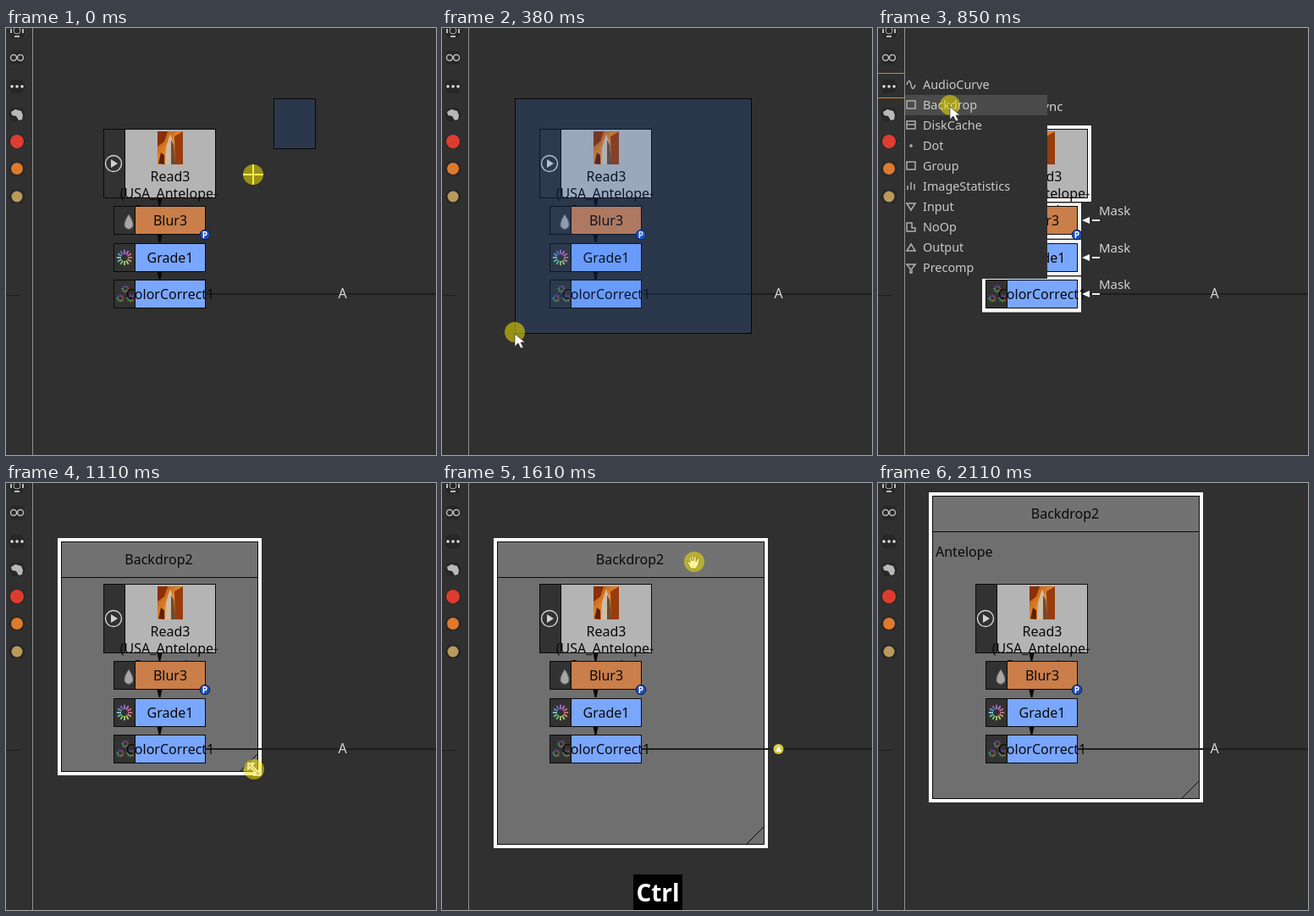
An HTML page that plays this animation: 508x504 px, repeating every 2.24 s.

```html
<!DOCTYPE html>
<html lang="en">
<head>
<meta charset="utf-8">
<title>Node graph backdrop</title>
<style>
html, body { margin: 0; width: 100%; height: 100%; overflow: hidden; background: #303030; }
svg { display: block; width: 508px; height: 504px; }
text { font: 16px "Noto Sans", "Open Sans", sans-serif; }
.mid { text-anchor: middle; }
</style>
</head>
<body>
<svg id="stage" viewBox="0 0 508 504"></svg>
<script>
const LOOP = 2240;
const STEPS = [0, 130, 250, 380, 500, 630, 850, 980, 1110, 1230, 1370, 1490, 1610, 1740, 1860, 1990, 2110];
const BG = '#303030', INK = '#0a0a0a', LIGHT = '#d2d2d2';

const attrs = o => Object.entries(o).map(([k, v]) => `${k}="${v}"`).join(' ');
const rect = (x, y, w, h, fill, o = {}) =>
  `<rect x="${x}" y="${y}" width="${w}" height="${h}" fill="${fill}" ${attrs(o)}/>`;
const circle = (x, y, r, fill, o = {}) => `<circle cx="${x}" cy="${y}" r="${r}" fill="${fill}" ${attrs(o)}/>`;
const path = (d, fill, stroke = 'none', width = 1) =>
  `<path d="${d}" fill="${fill}" stroke="${stroke}" stroke-width="${width}"/>`;
const label = (s, x, y, fill = INK, extra = 'class="mid"') => `<text x="${x}" y="${y + 6}" fill="${fill}" ${extra}>${s}</text>`;
const left = (s, x, y, fill, size = 16) => label(s, x, y, fill, `style="font-size:${size}px"`);
const group = (id, body) => `<g id="${id}">${body}</g>`;

// Ring of coloured spokes used by the colour nodes
function wheel(cx, cy, inner, outer, count, width, light) {
  return Array.from({ length: count }, (_, i) => {
    const a = i / count * 2 * Math.PI, c = Math.cos(a), s = Math.sin(a);
    return path(`M${cx + c * inner} ${cy + s * inner}L${cx + c * outer} ${cy + s * outer}`,
      'none', `hsl(${i * 360 / count},38%,${light}%)`, width);
  }).join('');
}

const nodeBox = (x, y, w, h, strip, fill) =>
  rect(x + .5, y + .5, w, h, fill, { stroke: INK }) + rect(x + 1, y + 1, strip, h - 1, '#323232') +
  path(`M${x + strip + .5} ${y}v${h}`, 'none', INK);

const smallNode = (name, y, fill, icon) => nodeBox(127, y, 108, 33, 25, fill) + icon + label(name, 194, y + 17);
const link = y => path(`M178.5 ${y}h6l-2 9h-2z`, INK);

function sidebar() {
  const dots = [7, 13, 19].map(x => circle(x, 69, 1.8, '#ddd')).join('');
  const frames = [4, 35, 69, 102, 134, 166, 199].map(y =>
    path(`M7 ${y - 8}h12l4 8l-4 8h-12l-4-8z`, '#272727')).join('');
  return rect(0, 0, 31, 504, BG) + path('M0 315.5h17', 'none', '#1f1f1f') + frames +
    path('M31.5 0V504', 'none', '#929292') +
    circle(13, 3, 4, 'none', { stroke: '#aaa' }) + path('M6 1v5M20 1v5M10 10h6', 'none', '#bbb', 2) +
    circle(9, 35, 3.5, 'none', { stroke: '#bbb', 'stroke-width': 1.5 }) +
    circle(17, 35, 3.5, 'none', { stroke: '#bbb', 'stroke-width': 1.5 }) + dots +
    path('M6 99l5-3 7 2 2 5-1 5-4 1-3-5-5-1z', '#b8b8b8') +
    circle(13, 134, 8, '#dd3d30') + circle(13, 166, 7, '#de7a2c') + circle(13, 199, 6.5, '#b99a5c');
}

function readNode() {
  return nodeBox(115, 119, 132, 81, 25, '#b4b4b4') +
    circle(127, 160, 9.5, 'none', { stroke: '#d0d0d0', 'stroke-width': 1.4 }) +
    path('M124 155l8 5-8 5z', '#d0d0d0') +
    rect(179, 122, 30, 39, 'url(#canyon)') +
    path('M179 122h12l-4 12-8 6z', '#8a2f08') + path('M199 128l10-6v39h-9z', '#983c0c') +
    path('M188 161l1-20 3-10 2-6 3 9 2 27z', '#d0bda6') + path('M195 132l3 6 2 23h-5z', '#6b4c38') +
    path('M180 160l3-13 4 3v11z', '#5f2008') +
    label('Read3', 194, 175) + label('(USA_Antelope-', 192.5, 195) + label('Canyon.jpg', 192, 215);
}

const whiteEdge = (x, y, w, h) => rect(x, y, w, h, '#f8f8f8', { stroke: '#111', 'stroke-width': .8 });

function selectedParts() {
  const masks = [227, 271, 314].map(y =>
    path(`M241 ${y}l9-4v8z`, '#fff') + path(`M253 ${y}h9`, 'none', '#eee', 2) +
    left('Mask', 261, y - 12, LIGHT, 15)).join('');
  return masks + path('M181.5 87v20', 'none', '#e4e4e4', 2) + path('M177.5 105h8l-4 9z', '#e4e4e4') +
    left('Sync', 186, 92, LIGHT, 15);
}

const selectedEdges = () => whiteEdge(110.5, 114.5, 142, 91) +
  [206, 249.5, 293].map(y => whiteEdge(122.5, y, 118, 43)).join('');

function menu() {
  const names = ['AudioCurve', 'Backdrop', 'DiskCache', 'Dot', 'Group', 'ImageStatistics', 'Input', 'NoOp', 'Output', 'Precomp'];
  const icons = ['M34 67q3-9 5 0t5 0', 'M34 86h10v9h-10z', 'M34 110h10v9h-10zM34 114h10', 'M39 137v4M37 139h4',
    'M34 158h10v9h-10z', 'M35 191v-5M39 191v-9M43 191v-7', 'M34 207l5 8 5-8z', 'M34 230h6v6h4v4h-10z',
    'M34 263l5-8 5 8z', 'M34 279h10l-4 5v5h-2v-5z'];
  return rect(32, 54, 168, 242, '#303030') + rect(32, 79, 168, 24, '#4b4b4b', { id: 'hover' }) +
    names.map((n, i) => left(n, 53, 66 + i * 24, '#c8c8c8', 14.4) + path(icons[i], 'none', '#b0b0b0', 1.5)).join('');
}

const pointers = {
  cross: path('M-12 0H12M0-12V12', 'none', '#f5ef50', 2),
  arrow: path('M0 2l0 15 4-4 3 6 3-1-3-6h5z', '#fff', '#333', .7),
  resize: path('M-7-7h7l-2.5 2.5 7 7 2.5-2.5v7h-7l2.5-2.5-7-7-2.5 2.5z', '#d8c94a', '#fff6b0', 1.3),
  hand: path('M-4 8l-4-7q0-3 3 0l-1-6q1-2 2 0l1 4v-6q1-2 2 0v6l1-5q2-2 2 0v6l2-4q2-1 2 1l-1 6-3 5z', '#fff3a0', '#8a7a10', .6)
};

const stage = document.getElementById('stage');
stage.innerHTML =
  `<defs><linearGradient id="canyon" x1="0" x2="1" y2="1"><stop stop-color="#b04b0a"/>
   <stop offset=".5" stop-color="#e48a2c"/><stop offset="1" stop-color="#8f3406"/></linearGradient></defs>` +
  rect(0, 0, 508, 504, BG) + group('backdrop', '') +
  path('M236 314H508', 'none', '#1e1e1e', 2) +
  group('outputName', label('A', 397.5, 313, '#d6d6d6')) +
  group('pipeDot', circle(397.5, 314, 6, '#d8cc3c') + path('M394 317l3.5-7 3.5 7z', '#fff')) +
  [201, 244, 288].map(link).join('') + group('edges', selectedEdges()) + readNode() +
  smallNode('Blur3', 210, '#ca7e4a', path('M145 220q8 12 3.5 16q-3.5 3-7 0q-4.500-4 3.500-16z', '#a6a6a6', '#666')) +
  smallNode('Grade1', 254, '#79a6ff', wheel(140, 271, 4, 9.2, 12, 2, 58)) +
  smallNode('ColorCorrect1', 297, '#79a6ff',
    wheel(141, 308, 2, 4.6, 8, 1.3, 48) + wheel(135, 319, 2, 4.6, 8, 1.3, 48) + wheel(147, 319, 2, 4.6, 8, 1.3, 48)) +
  circle(235, 244, 5.8, '#1d4fb8', { stroke: '#0b1e50' }) +
  `<text x="235" y="247.7" class="mid" fill="#fff" style="font-size:10px;font-weight:bold">P</text>` +
  group('inputs', selectedParts()) +
  `<rect id="marquee" fill="rgba(15,95,221,.15)" stroke="#080808"/>` +
  sidebar() +
  group('button', path('M0 53.500H31M0 82.500H31', 'none', '#d88328')) +
  group('menu', menu()) +
  group('ctrl', rect(226, 462, 58, 42, '#000') +
    `<text x="255" y="494" class="mid" fill="#fff" style="font-size:28px;font-weight:bold">Ctrl</text>`) +
  group('cursor', '');

const $ = id => document.getElementById(id);
const show = (id, on) => $(id).setAttribute('visibility', on ? 'visible' : 'hidden');

// Keys are [time, x, y], joined by straight moves
function track(keys, t) {
  const i = keys.findIndex(k => k[0] > t);
  if (i < 0) return keys[keys.length - 1].slice(1);
  if (i === 0) return keys[0].slice(1);
  const a = keys[i - 1], b = keys[i], u = (t - a[0]) / (b[0] - a[0]);
  return [1, 2].map(n => a[n] + (b[n] - a[n]) * u);
}

const cursorPath = [[0, 292, 173], [250, 112, 338], [380, 86, 359], [500, 48, 205], [630, 16, 66],
  [850, 85, 91], [980, 196, 226], [1110, 293, 338], [1230, 294, 338], [1370, 331, 383],
  [1490, 382, 428], [1610, 298, 93], [1740, 298, 93], [1990, 296, 39]];
const cornerPath = [[0, 316, 142], [250, 115, 337], [380, 86, 360]];
const sizePath = [[1230, 237, 276], [1370, 269, 317], [1490, 320, 362]];
const originPath = [[1740, 63, 67], [1990, 62, 13]];

function drawBackdrop(t) {
  const [x, y] = track(originPath, t).map(Math.round);
  const [w, h] = track(sizePath, t).map(Math.round);
  const r = x + w - 2.5, b = y + h - 2.5;
  return rect(x, y, w, h, '#6f6f6f', { stroke: '#fff', 'stroke-width': 4 }) +
    rect(x + 2.5, y + 2.5, w - 5, h - 5, '#6f6f6f', { stroke: INK }) +
    rect(x + 3, y + 3, w - 6, 41, '#727272') +
    path(`M${x + 3} ${y + 44.5}H${r}M${r - 21} ${b}L${r} ${b - 21}`, 'none', INK) +
    label('Backdrop2', x + w / 2 - 1, y + 23) + (t >= 2110 ? left('Antelope', x + 6, y + 68, INK) : '');
}

function pointerFor(t) {
  if (t < 380) return 'cross';
  if (t < 1110) return 'arrow';
  return t < 1610 ? 'resize' : 'hand';
}

function render(time) {
  const t = STEPS.filter(s => s <= time).pop();
  const within = (a, b) => t >= a && t < b;
  const selected = within(500, 980), ctrl = within(1610, 1990);

  show('marquee', t < 500);
  const [mx, my] = track(cornerPath, t).map(Math.round);
  Object.entries({ x: mx + .5, y: 83.5, width: 365 - mx, height: my - 83 })
    .forEach(([k, v]) => $('marquee').setAttribute(k, v));

  show('edges', selected);
  show('inputs', selected);
  show('button', within(630, 980));
  show('menu', within(630, 980));
  show('hover', t === 850);
  $('menu').setAttribute('opacity', t === 630 ? .18 : 1);
  show('ctrl', ctrl);
  show('pipeDot', ctrl);
  show('outputName', !ctrl);
  $('backdrop').innerHTML = t >= 980 ? drawBackdrop(t) : '';

  const [cx, cy] = track(cursorPath, t);
  show('cursor', t < 2110);
  $('cursor').setAttribute('transform', `translate(${cx} ${cy})`);
  $('cursor').innerHTML = circle(0, 0, 12, 'rgba(240,225,0,.55)') + pointers[pointerFor(t)];
}

const start = performance.now();
function tick() {
  render((performance.now() - start) % LOOP);
  requestAnimationFrame(tick);
}
tick();
</script>
</body>
</html>
```
